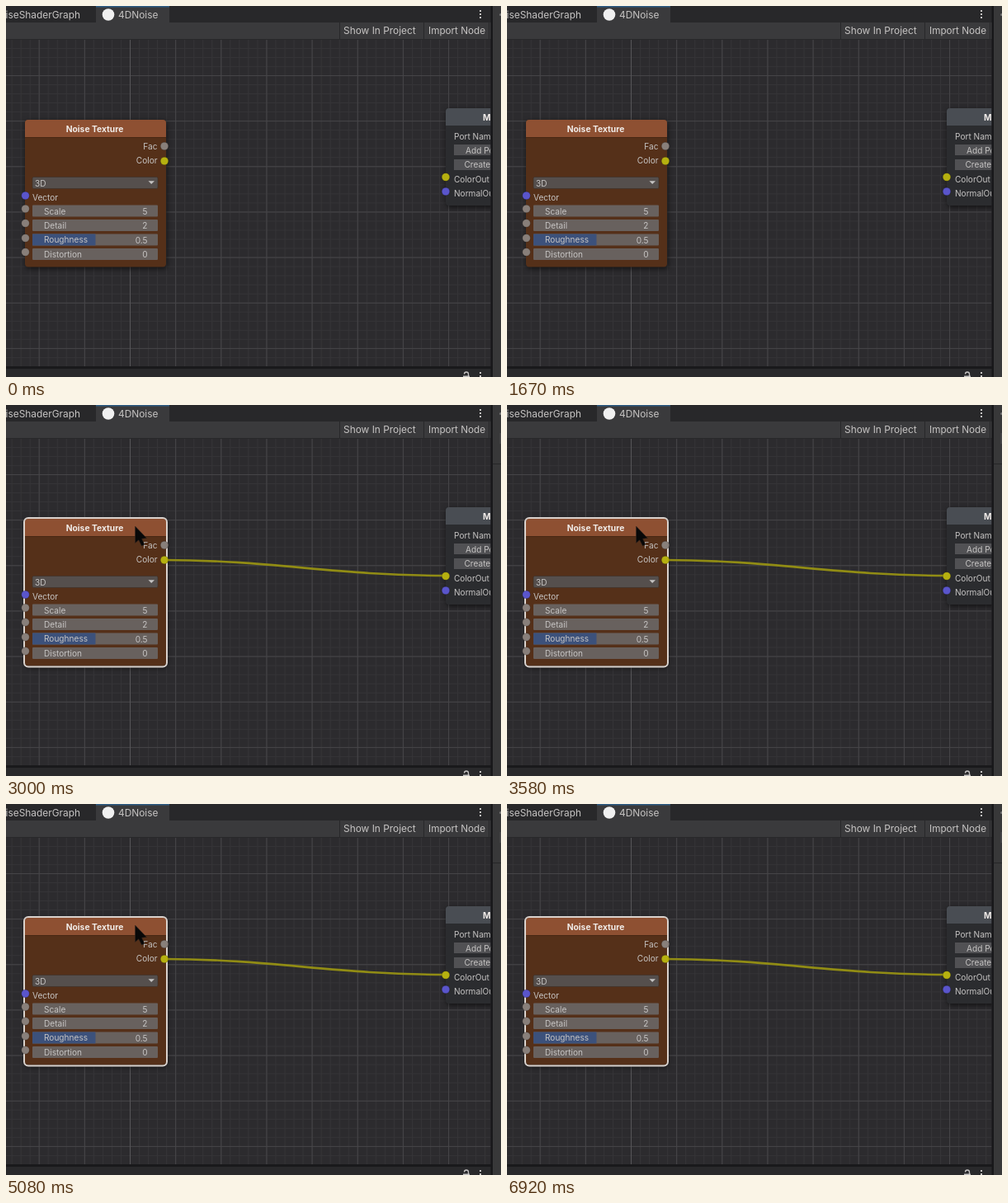
Animation of 600 by 450 pixels, one loop 7.58 s. Source, as an HTML page:

```html
<!DOCTYPE html>
<html lang="en">
<head>
<meta charset="utf-8">
<title>Noise node graph</title>
<style>
html, body { margin: 0; width: 100%; height: 100%; overflow: hidden; background: #2c2b2e; }
svg { display: block; width: 600px; height: 450px; font: 10.1px Inter, "Liberation Sans", sans-serif; fill: #c6c4c3; }
.bar { font-size: 11.9px; }
.title { font-size: 10.3px; font-weight: 700; fill: #f0ebe8; }
.end { text-anchor: end; }
.mid { text-anchor: middle; }
.grey { fill: #887f7a; }
.yellow { fill: #b6b010; }
.blue { fill: #5a55cb; }
.field { fill: #68615e; }
.button { fill: #515154; }
.shadow { filter: drop-shadow(1px 2px 3px #0009); }

.linked { visibility: hidden; animation: link 7.58s step-end infinite; }
.cursor { visibility: hidden; animation: point 7.58s step-end infinite; }
@keyframes link {
  0% { visibility: hidden; }
  38.5%, 100% { visibility: visible; }
}
@keyframes point {
  0% { visibility: hidden; transform: none; }
  27.7% { visibility: visible; transform: none; }
  38.5% { visibility: visible; transform: translate(-1px, -1px); }
  85.75%, 100% { visibility: hidden; transform: translate(-1px, -1px); }
}
</style>
</head>
<body>
<svg viewBox="0 0 600 450">
  <defs>
    <pattern id="minor" x="150" y="84" width="11.03" height="11.03" patternUnits="userSpaceOnUse">
      <path d="M0 .5H11.03M.5 0V11.03" stroke="#353437"/>
    </pattern>
    <pattern id="major" x="150" y="84" width="55.15" height="55.15" patternUnits="userSpaceOnUse">
      <path d="M0 .5H55.15M.5 0V55.15" stroke="#464548"/>
    </pattern>
    <clipPath id="view"><path d="M0 40H587.5V437H0Z"/></clipPath>
  </defs>

  <g clip-path="url(#view)">
    <path fill="#2c2b2e" d="M0 40H588V438H0Z"/>
    <path fill="url(#minor)" d="M0 40H588V438H0Z"/>
    <path fill="url(#major)" d="M0 40H588V438H0Z"/>
    <path stroke="#565558" d="M150.5 40V438"/>

    <!-- output node -->
    <g class="shadow">
      <rect x="533" y="124" width="80" height="118" rx="4" fill="#2b2c2f"/>
      <path fill="#494d53" d="M533 145V128a4 4 0 0 1 4-4H613V145Z"/>
    </g>
    <text class="title" x="578" y="138.5">Master</text>
    <text x="543" y="161.5">Port Name</text>
    <path class="button" d="M543 168H600V181H543ZM543 186H600V199H543Z"/>
    <text x="557" y="178.5">Add Port</text>
    <text x="555.5" y="196">Create</text>
    <text x="543" y="213.5">ColorOut</text>
    <text x="543" y="230.5">NormalOut</text>

    <!-- noise node -->
    <g class="shadow">
      <rect x="23" y="138" width="171" height="178.5" rx="4" fill="#553019"/>
      <path fill="#8e5032" d="M23 159V142a4 4 0 0 1 4-4H190a4 4 0 0 1 4 4V159Z"/>
    </g>
    <path stroke="#472713" d="M23 159.5H194"/>
    <g class="linked" fill="none">
      <rect x="22" y="137" width="173" height="180.5" rx="5" stroke="#d9d2cd" stroke-width="2"/>
      <path d="M192 188C320 188 400 207 533 207" stroke="#918c14" stroke-width="2.6"/>
    </g>
    <text class="title mid" x="107.5" y="152.5">Noise Texture</text>
    <text class="end" x="183.5" y="173.5">Fac</text>
    <text class="end" x="183.5" y="191">Color</text>
    <rect x="32" y="207.5" width="152" height="14" rx="1.5" fill="#554f4d" stroke="#3c3029" stroke-width=".6"/>
    <text x="35" y="218.5">3D</text>
    <path d="M172.5 212.3H180L176.2 216Z"/>
    <text x="32" y="235.5">Vector</text>
    <g class="field">
      <rect x="32" y="241.5" width="152" height="14" rx="1"/>
      <rect x="32" y="259" width="152" height="14" rx="1"/>
      <rect x="32" y="276.5" width="152" height="14" rx="1"/>
      <rect x="32" y="294" width="152" height="14" rx="1"/>
    </g>
    <path fill="#3c517b" d="M32 276.5H108.5V290.5H32Z"/>
    <g>
      <text x="46" y="252.5">Scale</text><text class="end" x="171.5" y="252.5">5</text>
      <text x="46" y="270">Detail</text><text class="end" x="171.5" y="270">2</text>
      <text x="46" y="287">Roughness</text><text class="end" x="171.5" y="287.5">0.5</text>
      <text x="46" y="304.5">Distortion</text><text class="end" x="171.5" y="304.5">0</text>
    </g>

    <!-- ports -->
    <g stroke="#0004" stroke-width=".8">
      <g class="grey">
        <circle cx="192" cy="170" r="4.8"/>
        <circle cx="23.5" cy="246" r="4.8"/>
        <circle cx="23.5" cy="263.5" r="4.8"/>
        <circle cx="23.5" cy="281.5" r="4.8"/>
        <circle cx="23.5" cy="298.5" r="4.8"/>
      </g>
      <circle class="yellow" cx="192" cy="188" r="4.8"/>
      <circle class="yellow" cx="533" cy="207.5" r="4.8"/>
      <circle class="blue" cx="23.5" cy="230" r="4.8"/>
      <circle class="blue" cx="533" cy="225" r="4.8"/>
    </g>
  </g>

  <!-- window frame -->
  <g class="bar">
    <path fill="#28282a" d="M0 0H588V20H0Z"/>
    <path fill="#3a3a3c" d="M109 0H198V20H109ZM0 20H588V40H0Z"/>
    <path fill="#2c5a82" d="M109 0H198V1.6H109Z"/>
    <path stroke="#28282a" d="M404.5 20V40M506.5 20V40M585.5 20V40M0 40.5H588"/>
    <text class="end" x="90" y="15">NoiseShaderGraph</text>
    <circle cx="124" cy="10.5" r="7.3" fill="#f0f0f0"/>
    <text x="136" y="15">4DNoise</text>
    <text x="409" y="34">Show In Project</text>
    <text x="512" y="34" font-size="11.7">Import Node</text>
    <path d="M574 5h2v2h-2zM574 9h2v2h-2zM574 13h2v2h-2z"/>
  </g>
  <path fill="#19191b" d="M0 437H588V440H0Z"/>
  <path fill="#29292b" d="M0 440H588V450H0Z"/>
  <path d="M554 448.5h8V450h-8zM574 444h2v2h-2zM574 448h2v2h-2z"/>
  <path d="M555.5 446.5a2.5 2.5 0 0 1 5 0V449" fill="none" stroke="#c6c4c3" stroke-width="1.3"/>
  <path fill="#18181a" d="M587.5 0H590V450H587.5Z"/>
  <path fill="#383839" d="M590 0H600V450H590Z"/>
  <circle cx="599.5" cy="10.5" r="1.5" fill="#777"/>
  <g class="linked">
    <path fill="#48484a" d="M598.5 34H600V47H598.5Z"/>
    <path stroke="#262628" d="M590 71.5H600"/>
  </g>

  <path class="cursor" fill="#080808" stroke="#3a2a22" stroke-width=".5" d="M157.5 148V168.5L161.8 164.8L165.4 172L169 170.2L165.6 163.3L171.5 162.6Z"/>
</svg>
</body>
</html>
```
